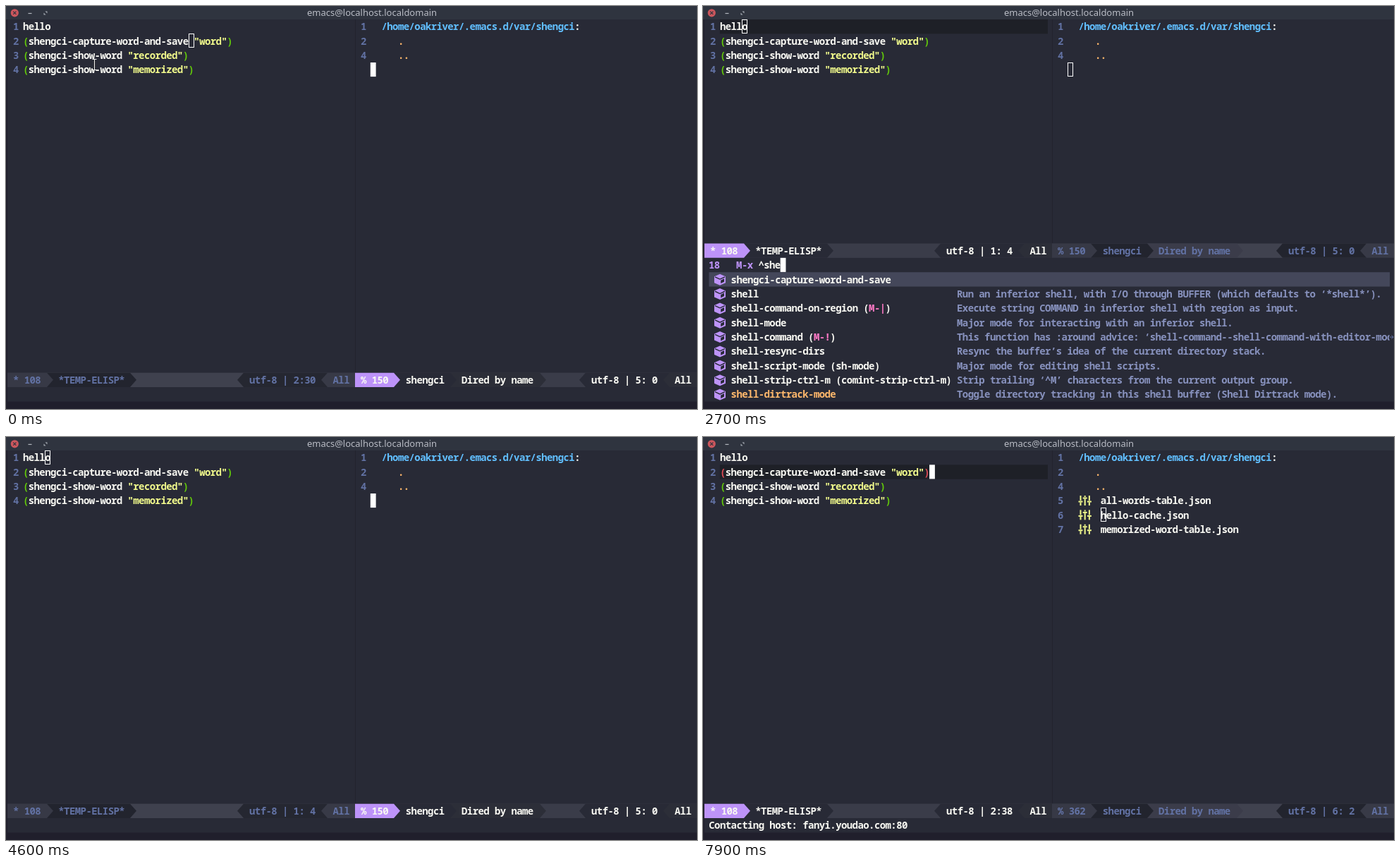
Write an HTML page with a canvas that moves like this. It is 980x571 px and loops after 8000 ms.

```html
<!DOCTYPE html>
<html lang="en">
<head>
<meta charset="utf-8">
<title>Editor session</title>
<style>
html, body { margin: 0; width: 980px; height: 571px; overflow: hidden; background: #282a36; }
canvas { display: block; width: 980px; height: 571px; }
</style>
</head>
<body>
<canvas id="stage"></canvas>
<script>
const W = 980, H = 571, LOOP = 8000;
const CELL = 7.82, ROW = 20.35, TOP = 19, ECHO = 540;
const LX = 23.9, RX = 516.8;
const MONO = '600 14px "Noto Sans Mono", "DejaVu Sans Mono", monospace';
const C = {
  bg: '#282a36', edge: '#201f2c', title: '#2f343f', line: '#1e2027', white: '#f8f8f2',
  dim: '#6272a4', purple: '#bd93f9', yellow: '#f1fa8c', green: '#62c80a', red: '#e04a55',
  blue: '#61bfff', orange: '#ffb86c', pink: '#ff79c6', doc: '#8791bd', pick: '#44475a'
};

const canvas = document.getElementById('stage');
const ctx = canvas.getContext('2d');
const dpr = window.devicePixelRatio || 1;
canvas.width = W * dpr;
canvas.height = H * dpr;

const rowY = n => TOP + n * ROW;

function rect(x, y, w, h, color) {
  ctx.fillStyle = color;
  ctx.fillRect(x, y, w, h);
}

function poly(points, color) {
  ctx.fillStyle = color;
  ctx.beginPath();
  points.forEach(([x, y]) => ctx.lineTo(x, y));
  ctx.fill();
}

function stroke(color, width, ...segments) {
  ctx.strokeStyle = color;
  ctx.lineWidth = width;
  ctx.beginPath();
  for (const [x1, y1, x2, y2] of segments) {
    ctx.moveTo(x1, y1);
    ctx.lineTo(x2, y2);
  }
  ctx.stroke();
}

function text(s, x, y, color) {
  ctx.fillStyle = color;
  ctx.fillText(s, x, y + 15.3);
}

// Draws [string, color] pairs one after another on the cell grid.
function runs(x, y, parts) {
  for (const [s, color] of parts) {
    text(s, x, y, color);
    x += s.length * CELL;
  }
}

function cursor(x, y, solid, ch) {
  if (solid) {
    rect(x, y, CELL, ROW - 0.3, '#ffffff');
    if (ch) text(ch, x, y, C.bg);
  } else {
    ctx.strokeStyle = '#ffffff';
    ctx.lineWidth = 1;
    ctx.strokeRect(Math.round(x) + 0.5, Math.round(y) + 0.5, 7, 19);
  }
}

function titleBar() {
  rect(0, 0, W, TOP, C.title);
  ctx.fillStyle = '#cc575d';
  ctx.beginPath();
  ctx.arc(12.3, 9.8, 5.6, 0, 7);
  ctx.fill();
  stroke('#2f343f', 1.2, [10.2, 7.7, 14.4, 11.9], [14.4, 7.7, 10.2, 11.9]);
  stroke('#b4b8c0', 1.2, [31.5, 10.5, 36.5, 10.5]);
  poly([[55.5, 7.5], [58.5, 7.5], [58.5, 10.5]], '#a4a9b2');
  poly([[53.5, 9.5], [53.5, 12.5], [56.5, 12.5]], '#a4a9b2');
  ctx.letterSpacing = '0px';
  ctx.font = '13px "Noto Sans", "Open Sans", sans-serif';
  ctx.textAlign = 'center';
  ctx.fillStyle = '#b9bcc5';
  ctx.fillText('emacs@localhost.localdomain', 519, 14);
  ctx.textAlign = 'left';
}

function modeLine(x0, x1, y, heads, tails, fill) {
  const mid = y + ROW / 2, end = y + ROW;
  rect(x0, y, x1 - x0, ROW, fill);
  for (const [x, color] of [...heads].reverse())
    poly([[x0, y], [x, y], [x + 9, mid], [x, end], [x0, end]], color);
  for (const [x, color] of tails)
    poly([[x1, y], [x + 9, y], [x, mid], [x + 9, end], [x1, end]], color);
}

function leftMode(y, on, pos) {
  const ink = on ? C.white : C.dim;
  modeLine(2, 495, y,
    [[58, on ? C.purple : '#373946'], [176, on ? C.bg : '#22242e']],
    [[328, on ? C.bg : '#252731'], [447, on ? '#2c2e38' : '#383a47']],
    on ? '#3a3c49' : '#3f414e');
  text('* 108', 10, y, ink);
  text('*TEMP-ELISP*', 74.3, y, ink);
  text('utf-8 | ' + pos, 345, y, ink);
  text('All', 463.5, y, ink);
}

function rightMode(y, on, pos, size) {
  const ink = on ? C.white : C.dim;
  modeLine(495, W, y,
    [[550, on ? C.purple : '#373946'], [630, on ? C.bg : '#22242e'], [757, on ? '#2c2e38' : '#3b3c4a']],
    [[813, on ? C.bg : '#22242e'], [932, on ? '#2c2e38' : '#383a47']],
    on ? '#3a3c49' : '#40424f');
  text('% ' + size, 503, y, ink);
  text('shengci', 566.8, y, ink);
  text('Dired by name', 646, y, ink);
  text('utf-8 | ' + pos, 830, y, ink);
  text('All', 948.3, y, ink);
}

function leftPane(s) {
  const [row, col] = s.at;
  const x = LX + col * CELL, y = rowY(row);
  if (s.hlLeft) rect(LX, y, 489 - LX, ROW, C.line);
  for (let i = 0; i < 4; i++) text(String(i + 1), 10, rowY(i), C.dim);
  text('hello', LX, rowY(0), C.white);
  const calls = [['capture-word-and-save', 'word'], ['show-word', 'recorded'], ['show-word', 'memorized']];
  calls.forEach(([name, arg], i) => {
    const paren = i === 0 && s.match ? C.red : C.green;
    runs(LX, rowY(i + 1), [['(', paren], ['shengci-' + name + ' ', C.white], ['"' + arg + '"', C.yellow], [')', paren]]);
  });
  const ch = row === 0 ? 'hello'[col] : '(shengci-capture-word-and-save "word")'[col];
  cursor(x, y, s.focus === 'left', ch);
}

function sliders(y) {
  [[535.5, 11.5], [541.7, 6.5], [547.9, 11.5]].forEach(([x, knob]) => {
    rect(x - 1, y + 3, 2, knob - 4.5, C.yellow);
    rect(x - 3, y + knob - 1, 6, 2, C.yellow);
    rect(x - 1, y + knob + 1, 2, 16 - knob, C.yellow);
  });
}

function rightPane(s) {
  const on = s.focus === 'right', names = ['all-words-table.json', 'hello-cache.json', 'memorized-word-table.json'];
  const y = rowY(s.file + 3);
  if (s.files && on) rect(RX, y, 974 - RX, ROW, C.line);
  [1, 2, 4].forEach((n, i) => text(String(n), 503, rowY(i), C.dim));
  runs(RX + 2 * CELL, rowY(0), [['/home/oakriver/.emacs.d/var/shengci', C.blue], [':', C.white]]);
  text('.', RX + 5 * CELL, rowY(1), C.orange);
  text('..', RX + 5 * CELL, rowY(2), C.orange);
  if (!s.files) return cursor(RX, y, on);
  names.forEach((name, i) => {
    text(String(i + 5), 503, rowY(i + 3), C.dim);
    sliders(rowY(i + 3));
    text(name, RX + 6 * CELL, rowY(i + 3), C.white);
  });
  cursor(RX + 6 * CELL, y, on, names[s.file][0]);
}

function cube(y) {
  const x = 24, m = y + 10.5;
  poly([[x, m - 8], [x + 8, m - 4.5], [x + 8, m + 4.5], [x, m + 8], [x - 8, m + 4.5], [x - 8, m - 4.5]], C.purple);
  stroke(C.bg, 1.4, [x - 7, m - 3.8, x, m - 0.5], [x + 7, m - 3.8, x, m - 0.5]);
  poly([[x + 1.2, m + 1], [x + 6, m - 1.5], [x + 6, m + 3], [x + 1.2, m + 5.4]], C.bg);
}

const COMMANDS = [
  ['shengci-capture-word-and-save'],
  ['shell', 'Run an inferior shell, with I/O through BUFFER (which defaults to ‘*shell*’).'],
  ['shell-command-on-region', 'Execute string COMMAND in inferior shell with region as input.', 'M-|'],
  ['shell-mode', 'Major mode for interacting with an inferior shell.'],
  ['shell-command', 'This function has :around advice: ‘shell-command--shell-command-with-editor-mode’.', 'M-!'],
  ['shell-resync-dirs', 'Resync the buffer’s idea of the current directory stack.'],
  ['shell-script-mode (sh-mode)', 'Major mode for editing shell scripts.'],
  ['shell-strip-ctrl-m (comint-strip-ctrl-m)', 'Strip trailing ‘^M’ characters from the current output group.'],
  ['shell-dirtrack-mode', 'Toggle directory tracking in this shell buffer (Shell Dirtrack mode).']
];

function prompt(s) {
  const y = ECHO - 9 * ROW;
  runs(8, y, [[String(s.total).padEnd(5), C.purple], ['M-x ', C.purple], ['^' + s.typed, C.white]]);
  cursor(8 + (10 + s.typed.length) * CELL, y, true);
  COMMANDS.slice(0, s.shown).forEach(([name, doc, key], i) => {
    const top = y + (i + 1) * ROW;
    if (i === 0) rect(8.5, top, 965.5, ROW, C.pick);
    cube(top);
    const parts = [[name, i === 8 ? C.orange : C.white]];
    if (key) parts.push([' (', C.white], [key, C.pink], [')', C.white]);
    runs(39.6, top, parts);
    if (!doc) return;
    ctx.save();
    ctx.beginPath();
    ctx.rect(0, top, 973.5, ROW);
    ctx.clip();
    text(doc, 360, top, C.doc);
    ctx.restore();
    if (i === 4) stroke(C.dim, 1, [974, top + 10.5, 979, top + 10.5], [976.5, top + 8, 979, top + 10.5], [976.5, top + 13, 979, top + 10.5]);
  });
}

function pointer(x, y) {
  stroke('#15161c', 3, [x, y - 7, x, y + 7]);
  stroke('#f0f0f0', 1.2, [x, y - 7, x, y + 7], [x - 3, y - 7.5, x + 3, y - 7.5], [x - 3, y + 7.5, x + 3, y + 7.5]);
}

function stateAt(t) {
  const during = (a, b) => t >= a && t < b;
  const mini = during(2400, 3600);
  const right = t < 700 || during(4600, 6500);
  return {
    focus: mini ? 'mini' : right ? 'right' : 'left',
    hlLeft: !right,
    at: t < 1200 ? [1, 30] : t < 1600 ? [0, 5] : t < 7000 ? [0, 4] : t < 7200 ? [1, 4] : [1, 38],
    match: t >= 7300,
    files: t >= 5100,
    file: t >= 5800 ? 1 : 0,
    mini,
    tall: during(2400, 3800),
    typed: t < 2700 ? '' : t < 2900 ? 'she' : t < 3000 ? 'shen' : 'sheng',
    total: t < 2900 ? 18 : 1,
    shown: t < 2900 ? 9 : t < 3100 ? 1 : 0,
    message: during(3600, 3900) || t >= 7900,
    mouse: t < 700 ? [125.5, 83] : t < 1200 ? [945.5, 564] : t < 2700 ? [945.5, 557.5] : null
  };
}

function draw(t) {
  const s = stateAt(t);
  ctx.setTransform(dpr, 0, 0, dpr, 0, 0);
  rect(0, 0, W, H, C.bg);
  rect(0, TOP, 2, H - TOP, C.edge);
  rect(0, 560.5, W, H - 560.5, C.edge);
  titleBar();

  ctx.font = MONO;
  ctx.letterSpacing = '0px';
  ctx.letterSpacing = CELL - ctx.measureText('0').width + 'px';
  const modeY = s.tall ? ECHO - 10 * ROW : ECHO - ROW;
  rect(495, TOP, 1, modeY - TOP, '#22232d');
  leftPane(s);
  rightPane(s);
  leftMode(modeY, s.focus === 'left' || s.mini, s.at[0] + 1 + ':' + String(s.at[1]).padStart(2));
  rightMode(modeY, s.focus === 'right', s.files ? s.file + 5 + ': 2' : '5: 0', s.files ? 362 : 150);
  if (s.mini) prompt(s);
  if (s.message) text('Contacting host: fanyi.youdao.com:80', 8.3, ECHO, C.white);
  if (s.mouse) pointer(...s.mouse);
}

const start = performance.now();
function tick() {
  draw((performance.now() - start) % LOOP);
  requestAnimationFrame(tick);
}
tick();
</script>
</body>
</html>
```
